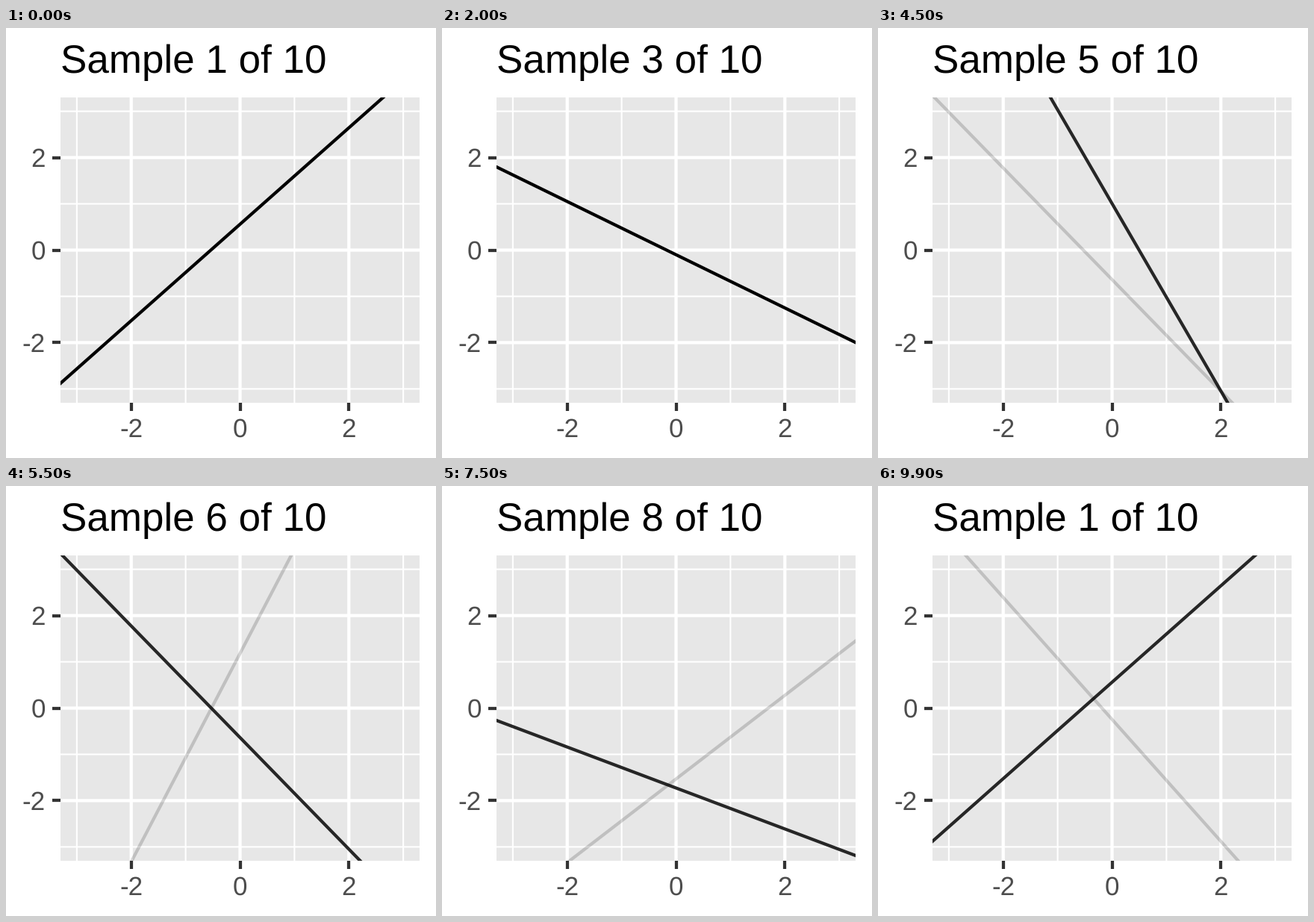
These frames come from a looping animation (576 by 576 pixels, 10 s). A matplotlib script:

```python
import matplotlib.pyplot as plt
from matplotlib.animation import FuncAnimation
from matplotlib.ticker import MultipleLocator

SIZE, DPI = 576, 144
LEFT, RIGHT, TOP, BOTTOM = 73, 554, 93, 502
LIMIT = 3.3
STROKE = 2.13
LABEL_PT = 17.6
FRAMES, STATE_FRAMES = 100, 10

# (intercept, slope) of each sampled line
LINES = [
    (0.559, 1.042), (-0.813, -0.9065), (-0.1, -0.575), (0.0685, -0.368),
    (1.007, -2.026), (-0.637, -1.206), (1.182, 2.253), (-1.727, -0.4426),
    (-1.532, 0.904), (-0.244, -1.318),
]

plt.rcParams["font.family"] = "Liberation Sans"
plt.rcParams["text.hinting"] = "none"
plt.rcParams["text.hinting_factor"] = 1

fig = plt.figure(figsize=(SIZE / DPI, SIZE / DPI), dpi=DPI, facecolor="white")
ax = fig.add_axes([LEFT / SIZE, 1 - BOTTOM / SIZE,
                   (RIGHT - LEFT) / SIZE, (BOTTOM - TOP) / SIZE])


def text_at(x, baseline, text, points, color):
    return fig.text(x / SIZE, 1 - baseline / SIZE, text, fontsize=points,
                    color=color, ha="left", va="baseline")


def label_width(text):
    em = LABEL_PT * DPI / 72
    return em * sum(0.333 if c == "-" else 0.556 for c in text)


def style_panel():
    ax.set(xlim=(-LIMIT, LIMIT), ylim=(-LIMIT, LIMIT), facecolor="#e7e7e7")
    ax.spines[:].set_visible(False)
    ax.set_axisbelow(True)
    for axis in (ax.xaxis, ax.yaxis):
        axis.set_major_locator(MultipleLocator(2))
        axis.set_minor_locator(MultipleLocator(1))
    ax.grid(which="major", color="white", linewidth=STROKE, snap=False)
    ax.grid(which="minor", color="white", linewidth=STROKE / 2, snap=False)
    ax.tick_params(which="major", length=5.5, width=STROKE, color="#333333",
                   labelbottom=False, labelleft=False)
    ax.tick_params(which="minor", length=0)


def add_tick_labels():
    for value in (-2, 0, 2):
        text = str(value)
        share = value / (2 * LIMIT)
        x = (LEFT + RIGHT) / 2 + share * (RIGHT - LEFT)
        y = (TOP + BOTTOM) / 2 - share * (BOTTOM - TOP)
        width = label_width(text)
        text_at(x - width / 2, 547.5, text, LABEL_PT, "#4d4d4d")
        text_at(53.2 - width, y + 12.5, text, LABEL_PT, "#4d4d4d")


style_panel()
add_tick_labels()
title = text_at(LEFT, 60, "", 26.4, "black")

ends = (-4, 4)
lines = [ax.plot(ends, [a + b * x for x in ends], color="black",
                 linewidth=STROKE, solid_capstyle="butt", alpha=0)[0]
         for a, b in LINES]


def update(frame):
    state, step = divmod(frame, STATE_FRAMES)
    following = (state + 1) % len(LINES)
    # the first state is held one frame shorter
    hold = 3 if state == 0 else 4
    fade = max(0, step - hold) / (STATE_FRAMES - hold)

    for line in lines:
        line.set_alpha(0)
    lines[state].set_alpha(1 - fade)
    lines[following].set_alpha(fade)

    closest = state if fade <= 0.5 else following
    title.set_text(f"Sample {closest + 1} of {len(LINES)}")
    return [*lines, title]


anim = FuncAnimation(fig, update, frames=FRAMES, interval=100,
                     repeat=True, repeat_delay=0)
plt.show()
```
